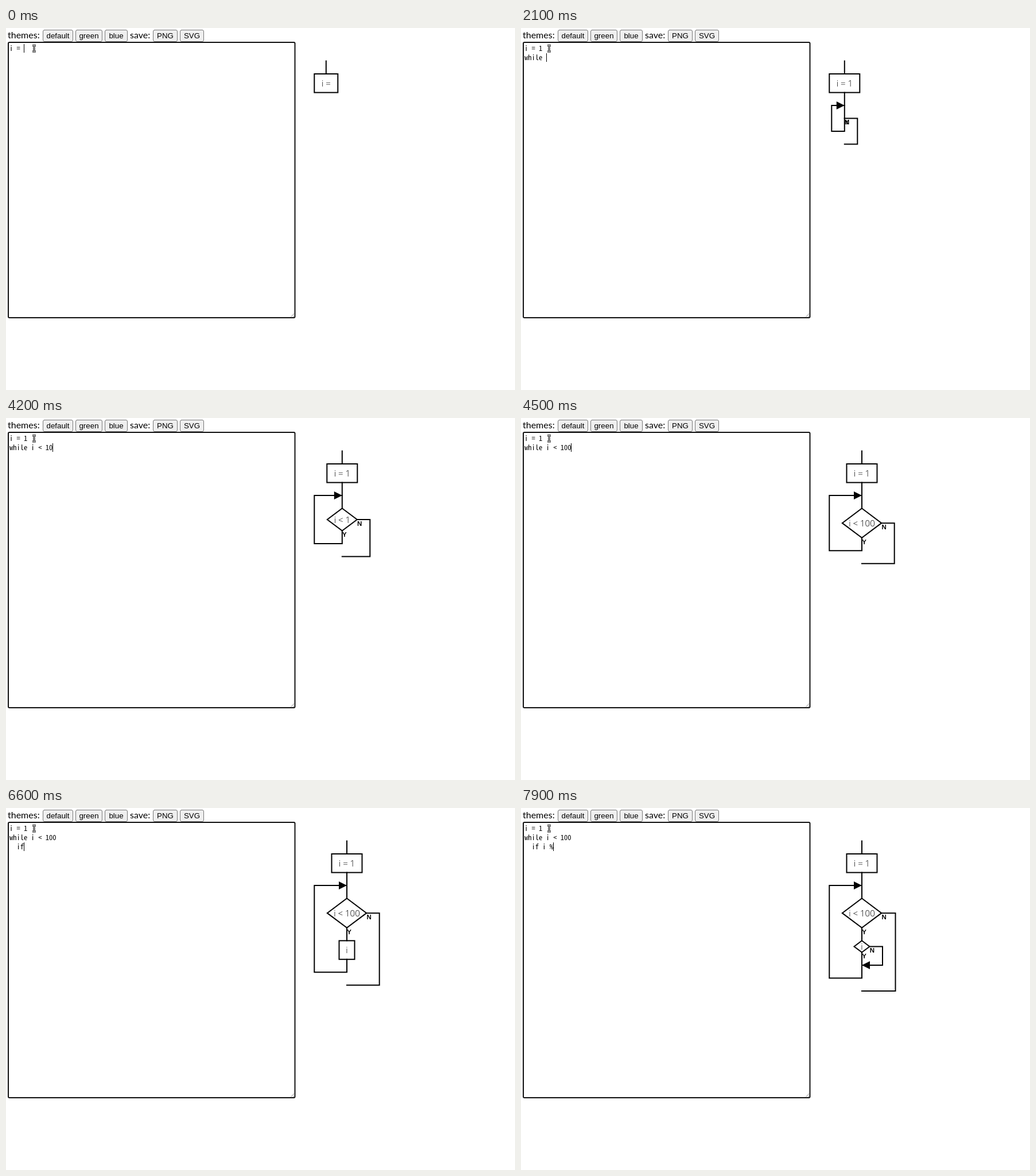
Animation of 887x631 px, one loop 8 s. Source, as an HTML page with a canvas:

```html
<!DOCTYPE html>
<html lang="en">
<head>
<meta charset="utf-8">
<title>Code to flowchart</title>
<style>
  html, body { margin: 0; width: 100%; height: 100%; overflow: hidden; background: #fff; }
  canvas { display: block; }
</style>
</head>
<body>
<canvas id="stage" width="887" height="631"></canvas>
<script>
const ctx = document.getElementById('stage').getContext('2d');
const LOOP = 8000;
const GAP = 22.5;      // length of a connector
const BOX_H = 32.5;
const LEFT = 537;      // left edge of the flowchart
const ADVANCE = 6.27;  // width of one editor character
const LABEL_FONT = '300 15px "Open Sans", sans-serif';
const MONO = '"Noto Sans Mono CJK JP", "Noto Sans Mono", monospace';

// [time, text, caret hidden]
const L1 = 'i = 1\n', L2 = L1 + 'while i < 100\n';
const typing = [
  [0, 'i = '], [100, 'i = 1'], [700, L1], [1100, L1 + 'w'], [1400, L1 + 'whi'],
  [1700, L1 + 'whil'], [1800, L1 + 'while'], [2000, L1 + 'while '],
  [2300, L1 + 'while i'], [2400, L1 + 'while i '], [2800, L1 + 'while i <'],
  [3400, L1 + 'while i <', true], [3800, L1 + 'while i < '], [4000, L1 + 'while i < 1'],
  [4200, L1 + 'while i < 10'], [4400, L1 + 'while i < 100'], [4900, L2],
  [5500, L2, true], [5600, L2 + ' '], [5800, L2 + '  '], [6400, L2 + '  ', true],
  [6500, L2 + '  i'], [6600, L2 + '  if'], [7100, L2 + '  if '],
  [7400, L2 + '  if i'], [7500, L2 + '  if i '], [7900, L2 + '  if i %']
];

// [time, first box, second kind, second label, body kind, body label]
const charts = [
  [0, 'i ='], [200, 'i = 1'], [1300, 'i = 1', 'box', 'w'], [1500, 'i = 1', 'box', 'whi'],
  [1800, 'i = 1', 'box', 'whil'], [1900, 'i = 1', 'while', 'while'],
  [2100, 'i = 1', 'while', ''], [2400, 'i = 1', 'while', 'i'],
  [3000, 'i = 1', 'while', 'i <'], [4100, 'i = 1', 'while', 'i < 1'],
  [4300, 'i = 1', 'while', 'i < 10'], [4500, 'i = 1', 'while', 'i < 100'],
  [6600, 'i = 1', 'while', 'i < 100', 'box', 'i'],
  [6700, 'i = 1', 'while', 'i < 100', 'if', 'if'],
  [7200, 'i = 1', 'while', 'i < 100', 'if', ''],
  [7500, 'i = 1', 'while', 'i < 100', 'if', 'i']
];

const halfWidths = {
  '': 0, i: 13.5, w: 17, if: 17.2, whi: 23.5, whil: 25.3, while: 28.8,
  'i =': 20.5, 'i <': 20.7, 'i = 1': 26.5, 'i < 1': 26, 'i < 10': 30, 'i < 100': 34.2
};

const current = (steps, t) => steps.findLast(step => step[0] <= t);

function text(str, x, y, font, align = 'left') {
  ctx.font = font;
  ctx.textAlign = align;
  ctx.fillStyle = '#000';
  ctx.fillText(str, x, y);
}

function line(...points) {
  ctx.beginPath();
  for (let i = 0; i < points.length; i += 2) ctx.lineTo(points[i], points[i + 1]);
  ctx.stroke();
}

function roundRect(x, y, w, h, r) {
  ctx.beginPath();
  ctx.roundRect(x, y, w, h, r);
}

function button(label, x, w) {
  roundRect(x + .5, 3.5, w - 1, 20, 2.5);
  ctx.fillStyle = '#efefef';
  ctx.fill();
  ctx.strokeStyle = '#767676';
  ctx.lineWidth = 1;
  ctx.stroke();
  text(label, x + w / 2, 18, '13.333px "Liberation Sans", Arial, sans-serif', 'center');
}

function drawPage() {
  ctx.fillStyle = '#fff';
  ctx.fillRect(0, 0, 887, 631);
  text('themes:', 3, 18, '16px Lato, sans-serif');
  text('save:', 216, 18, '16px Lato, sans-serif');
  button('default', 64, 53);
  button('green', 121, 47);
  button('blue', 172, 40);
  button('PNG', 256, 43);
  button('SVG', 303, 42);

  roundRect(4, 25, 499.5, 480, 2);
  ctx.fillStyle = '#fff';
  ctx.fill();
  ctx.strokeStyle = '#101010';
  ctx.lineWidth = 2;
  ctx.stroke();
  ctx.strokeStyle = '#777';
  ctx.lineWidth = .8;
  line(496.5, 503.5, 502, 498);
  line(500, 503.5, 502, 501.5);
}

function drawEditor([, content, caretHidden]) {
  ctx.font = '100px ' + MONO;
  const size = ADVANCE * 100 / (ctx.measureText('0').width / 100) / 100;
  const rows = content.split('\n');
  rows.forEach((row, i) => text(row, 6, 40 + 16 * i, `${size}px ${MONO}`));
  if (!caretHidden) {
    const last = rows.length - 1;
    ctx.fillRect(Math.floor(6.4 + ADVANCE * rows[last].length), 28 + 16 * last, 1, 15);
  }
}

function drawPointer() {
  const beam = () => {
    line(46, 30.5, 52, 30.5);
    line(46, 41, 52, 41);
    line(49, 31, 49, 41);
  };
  ctx.lineCap = 'butt';
  ctx.strokeStyle = '#000';
  ctx.lineWidth = 3;
  beam();
  ctx.strokeStyle = '#fff';
  ctx.lineWidth = 1;
  beam();
}

function box(label, cx, y) {
  const half = halfWidths[label];
  ctx.strokeRect(cx - half, y, half * 2, BOX_H);
  text(label, cx, y + 22, LABEL_FONT, 'center');
  return y + BOX_H;
}

function diamond(label, cx, y) {
  const half = halfWidths[label], mid = y + half * .75, bottom = y + half * 1.5;
  const small = 'bold 11.5px "Liberation Sans", Arial, sans-serif';
  if (half) {
    ctx.beginPath();
    ctx.moveTo(cx, y);
    ctx.lineTo(cx + half, mid);
    ctx.lineTo(cx, bottom);
    ctx.lineTo(cx - half, mid);
    ctx.closePath();
    ctx.stroke();
  }
  text(label, cx, mid + 5.5, LABEL_FONT, 'center');
  text('N', cx + half + .3, mid + 10.7, small);
  text('Y', cx + .3, bottom + 10.7, small);
  return { right: cx + half, mid, bottom };
}

function arrow(x, y, dir) {
  ctx.beginPath();
  ctx.moveTo(x, y);
  ctx.lineTo(x - 14 * dir, y - 7);
  ctx.lineTo(x - 14 * dir, y + 7);
  ctx.fillStyle = '#000';
  ctx.fill();
}

function ifBlock(label, cx, y) {
  const d = diamond(label, cx, y), join = d.bottom + GAP, side = d.right + GAP;
  line(cx, d.bottom, cx, join);
  line(d.right, d.mid, side, d.mid, side, join, cx + 2, join);
  arrow(cx, join, -1);
  return join;
}

function whileBlock(label, cx, y, bodyKind, bodyLabel) {
  const half = halfWidths[label], bodyHalf = halfWidths[bodyLabel] || 0;
  const left = cx - Math.max(half, bodyHalf) - GAP;
  const right = cx + Math.max(half, bodyHalf + (bodyKind === 'if' ? GAP : 0)) + GAP;
  line(cx, y, cx, y + GAP);
  const d = diamond(label, cx, y + GAP);
  let end = d.bottom;
  if (bodyKind) {
    line(cx, end, cx, end + GAP);
    end = (bodyKind === 'if' ? ifBlock : box)(bodyLabel, cx, end + GAP);
  }
  const back = end + GAP, exit = back + GAP;
  line(cx, end, cx, back, left, back, left, y, cx - 2, y);
  arrow(cx, y, 1);
  line(d.right, d.mid, right, d.mid, right, exit, cx, exit);
}

function drawChart([, first, kind, label, bodyKind, bodyLabel]) {
  const reach = kind === 'while' ? halfWidths[label] + GAP : 0;
  const cx = LEFT + .3 + Math.max(halfWidths[first], reach);
  ctx.strokeStyle = '#000';
  ctx.lineWidth = 2;
  ctx.lineCap = 'square';
  line(cx, 57.5, cx, 80);
  const end = box(first, cx, 80);
  if (!kind) return;
  line(cx, end, cx, end + GAP);
  if (kind === 'box') box(label, cx, end + GAP);
  else whileBlock(label, cx, end + GAP, bodyKind, bodyLabel);
}

function render(now) {
  const t = now % LOOP;
  drawPage();
  drawEditor(current(typing, t));
  drawPointer();
  drawChart(current(charts, t));
  requestAnimationFrame(() => render(performance.now() - start));
}

const start = performance.now();
render(0);
</script>
</body>
</html>
```
